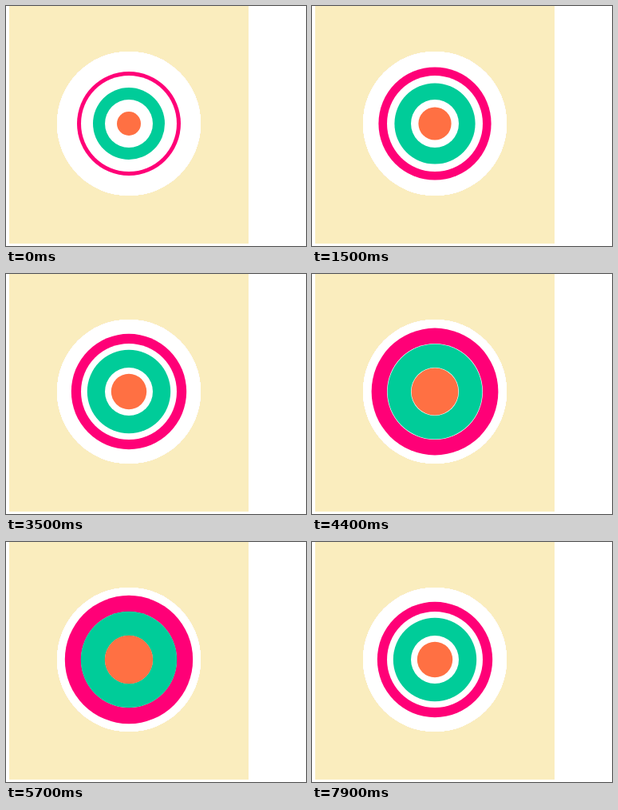
Write an HTML page with a canvas that moves like this. It is 376 px wide and 300 px high and loops after 8 s.

```html
<!DOCTYPE html>
<html>
<head>
<meta charset="utf-8">
<style>
  html, body { margin: 0; width: 100%; height: 100%; overflow: hidden; background: #fff; }
  canvas { display: block; }
</style>
</head>
<body>
<canvas width="376" height="300"></canvas>
<script>
const ctx = document.querySelector('canvas').getContext('2d');
const LOOP = 8000, STEP = 100;   // ms
const SPEED = 0.024;             // px of radius per ms
const PERIOD = 3800 / 3;         // one grow and shrink, ms

function disc(radius, color) {
  ctx.fillStyle = color;
  ctx.beginPath();
  ctx.arc(154, 147, radius, 0, Math.PI * 2);
  ctx.fill();
}

function draw(now) {
  const time = Math.floor((now % LOOP) / STEP) * STEP;
  const phase = time % PERIOD;
  const grow = SPEED * Math.min(phase, PERIOD - phase);

  disc(90, '#fff');
  disc(65 + grow, '#ff0077');
  disc(60, '#fff');
  disc(45 + grow, '#00cc99');
  disc(30, '#fff');
  disc(15 + grow, '#ff7043');
  requestAnimationFrame(draw);
}

ctx.fillStyle = '#faedbe';
ctx.fillRect(4, 0, 300, 297);
// Repeated fills harden the edge of the white disc
for (let i = 0; i < 60; i++) disc(90, '#fff');
draw(0);
</script>
</body>
</html>
```
